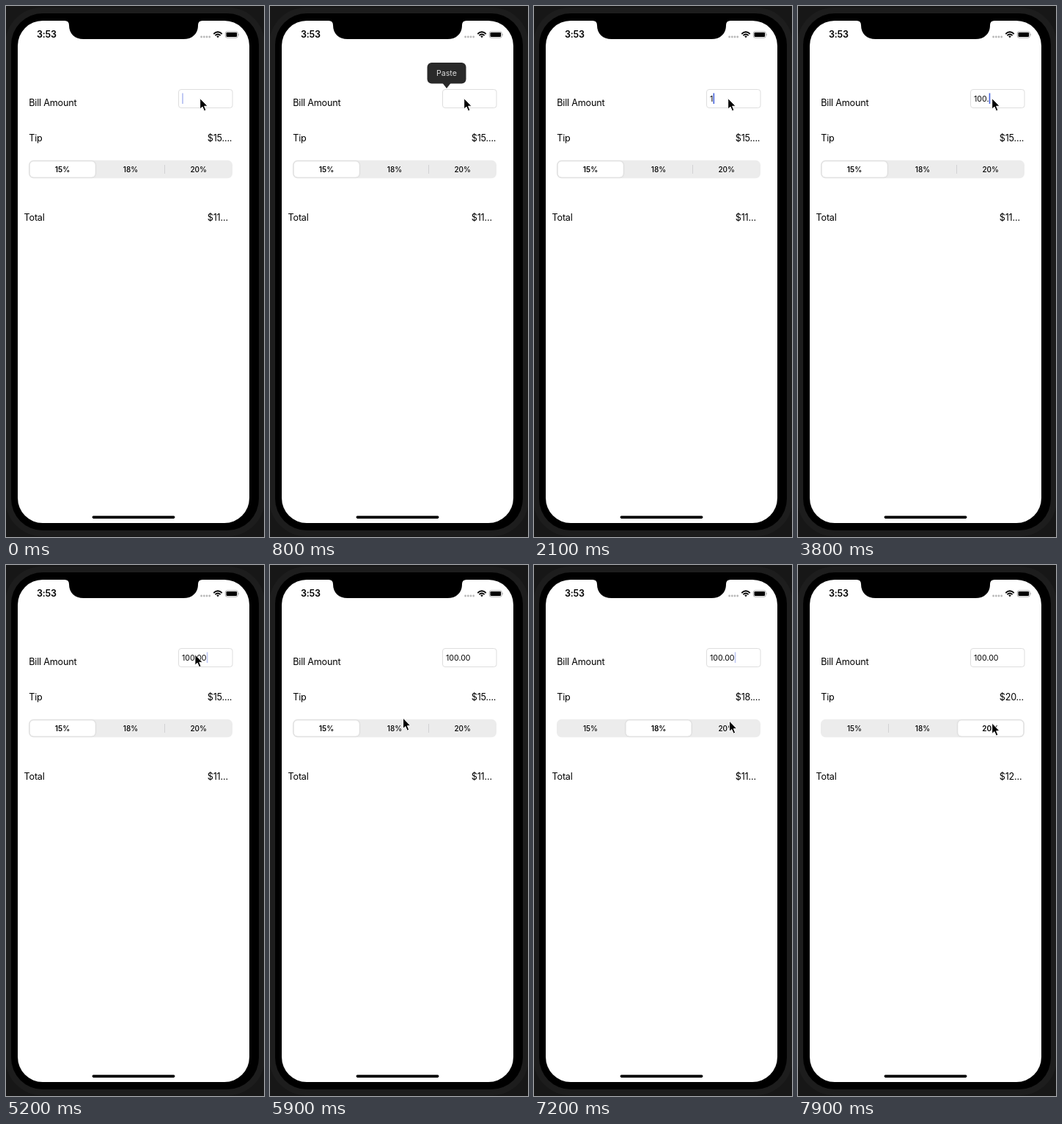
Recreate the animation shown at these times as an HTML page. Size 352x722 px, loop 8000 ms.

```html
<!DOCTYPE html>
<html lang="en">
<head>
<meta charset="utf-8">
<title>Tip calculator</title>
<style>
  html, body { margin: 0; width: 100%; height: 100%; overflow: hidden; background: #171717; }
  svg { display: block; width: 100vw; height: 100vh; }
  text { font: 400 12.6px Inter, Roboto, sans-serif; letter-spacing: -.2px; }
  .clock { font-weight: 600; font-size: 12.5px; }
  .seg, #bill, #menu text { font-size: 10.6px; letter-spacing: 0; }
  .seg { font-size: 10px; text-anchor: middle; }
  #menu text { fill: #d4d4d4; text-anchor: middle; }
  #thumb { filter: drop-shadow(0 .8px 1px rgba(0, 0, 0, .18)); }
</style>
</head>
<body>
<svg viewBox="0 0 352 722">
  <!-- phone -->
  <rect width="352" height="722" fill="#171717"/>
  <rect x="-1" y="2" width="354" height="719" rx="50" fill="#1d1d1d"/>
  <rect x="7" y="10" width="338" height="703" rx="43"/>
  <rect x="16" y="20" width="316" height="683" rx="34" fill="#fff"/>
  <path d="M80 19V20Q86 20 86 26C86 38 94 45 106 45H242C254 45 262 38 262 26Q262 20 268 20V19Z"/>
  <rect x="117.5" y="693.2" width="113" height="3.7" rx="1.8"/>

  <!-- status bar -->
  <text class="clock" x="42" y="43.3">3:53</text>
  <path d="M266.6 42H279" stroke="#b8b8b8" stroke-width="2.8" stroke-linecap="round" stroke-dasharray="0 3.7"/>
  <path d="M283.3 38Q289 32.6 294.7 38M285.4 40.2Q289 36.9 292.6 40.2" fill="none" stroke="#000" stroke-width="1.8"/>
  <path d="M287.2 41.2Q289 39.8 290.8 41.2L289 43.2Z"/>
  <rect x="299.3" y="34.8" width="17" height="8.4" rx="2.4" fill="none" stroke="#999" stroke-width=".8"/>
  <rect x="300.5" y="36" width="14.6" height="6" rx="1.3"/>
  <path d="M317.4 37.5Q319 39 317.4 40.5Z" fill="#999"/>

  <!-- form -->
  <text x="31.3" y="135.6">Bill Amount</text>
  <text x="31.3" y="183.7">Tip</text>
  <text x="24.6" y="291.7">Total</text>
  <text id="tip" x="274.8" y="183.7"></text>
  <text id="total" x="274.8" y="291.7"></text>
  <rect x="235.5" y="113.5" width="73.5" height="25" rx="3.5" fill="#fff" stroke="#dedede"/>
  <text id="bill" x="240" y="130"></text>
  <rect id="caret" y="118.5" width="1.6" height="14.5" fill="#4664dc"/>

  <!-- segmented control -->
  <rect x="31" y="209.8" width="278" height="24.4" rx="6.5" fill="#ececec"/>
  <path class="sep" d="M123.5 216v12" stroke="#d2d2d4"/>
  <path class="sep" d="M216.5 216v12" stroke="#d2d2d4"/>
  <rect id="thumb" y="211.2" width="89.2" height="21.6" rx="5" fill="#fff"/>
  <text class="seg" x="77" y="225.7">15%</text>
  <text class="seg" x="170" y="225.7">18%</text>
  <text class="seg" x="262.7" y="225.7">20%</text>

  <g id="menu">
    <rect x="214.5" y="77" width="53" height="28.5" rx="6"/>
    <path d="M235.5 105L241 112L246.5 105Z"/>
    <text x="241" y="95.2">Paste</text>
  </g>

  <path id="cursor" d="M0 0V14.6L3.3 11.6L5.7 17.2L8.2 16.1L5.9 10.7H10.4Z" stroke="#fff" stroke-linejoin="round"/>
</svg>
<script>
const LOOP = 8000, STEP = 100;
const $ = id => document.getElementById(id);
const labels = document.querySelectorAll('.seg');
const seps = document.querySelectorAll('.sep');

const keys = [2000, 2500, 2900, 3700, 4000, 4300];
const focus = -910, tap = 850;
const picks = [6400, 7400];

// pointer moves: start, duration, destination
const home = [264.7, 125.5];
const moves = [
  [5100, 450, 234, 108],
  [5600, 300, 181.5, 208],
  [6000, 200, 175, 218],
  [6800, 400, 266.5, 212],
  [7200, 200, 264.7, 215]
];

const ramp = (t, start, length) => Math.min(1, Math.max(0, (t - start) / length));
const easeOut = p => 1 - (1 - p) ** 3;
const countPast = (times, t) => times.filter(time => t >= time).length;

// The blink restarts with every tap or key press.
function caretOpacity(t) {
  const last = Math.max(...[focus, tap, ...keys].filter(time => t >= time));
  const phase = (t - last) % 1000;
  return 1 - ramp(phase, 440, 140) + ramp(phase, 850, 140);
}

function pointer(t) {
  let [x, y] = home;
  for (const [start, length, toX, toY] of moves) {
    const p = ramp(t, start, length);
    x += (toX - x) * p;
    y += (toY - y) * p;
  }
  return [x, y];
}

function draw(t) {
  const bill = $('bill');
  bill.textContent = '100.00'.slice(0, countPast(keys, t));
  $('caret').setAttribute('x', 240.2 + bill.getComputedTextLength());
  $('caret').setAttribute('opacity', caretOpacity(t));
  $('menu').setAttribute('opacity', ramp(t, 550, 300) - ramp(t, 1820, 240));

  const picked = countPast(picks, t);
  $('tip').textContent = ['$15....', '$18....', '$20...'][picked];
  $('total').textContent = picked < 2 ? '$11...' : '$12...';
  labels.forEach((label, i) => label.style.fontWeight = i === picked ? 600 : 500);

  // A separator shows only when the thumb is away from both its sides.
  const slide = picks.reduce((sum, time) => sum + easeOut(ramp(t, time - 50, 450)), 0);
  $('thumb').setAttribute('x', 32.6 + 92.8 * slide);
  seps.forEach((sep, i) => sep.setAttribute('opacity', ramp(Math.abs(slide - i - .5), .5, 1)));

  $('cursor').setAttribute('transform', `translate(${pointer(t)})`);
}

const begin = performance.now();
function tick() {
  const t = (performance.now() - begin) % LOOP;
  draw(Math.floor(t / STEP) * STEP);
  requestAnimationFrame(tick);
}
tick();
</script>
</body>
</html>
```
